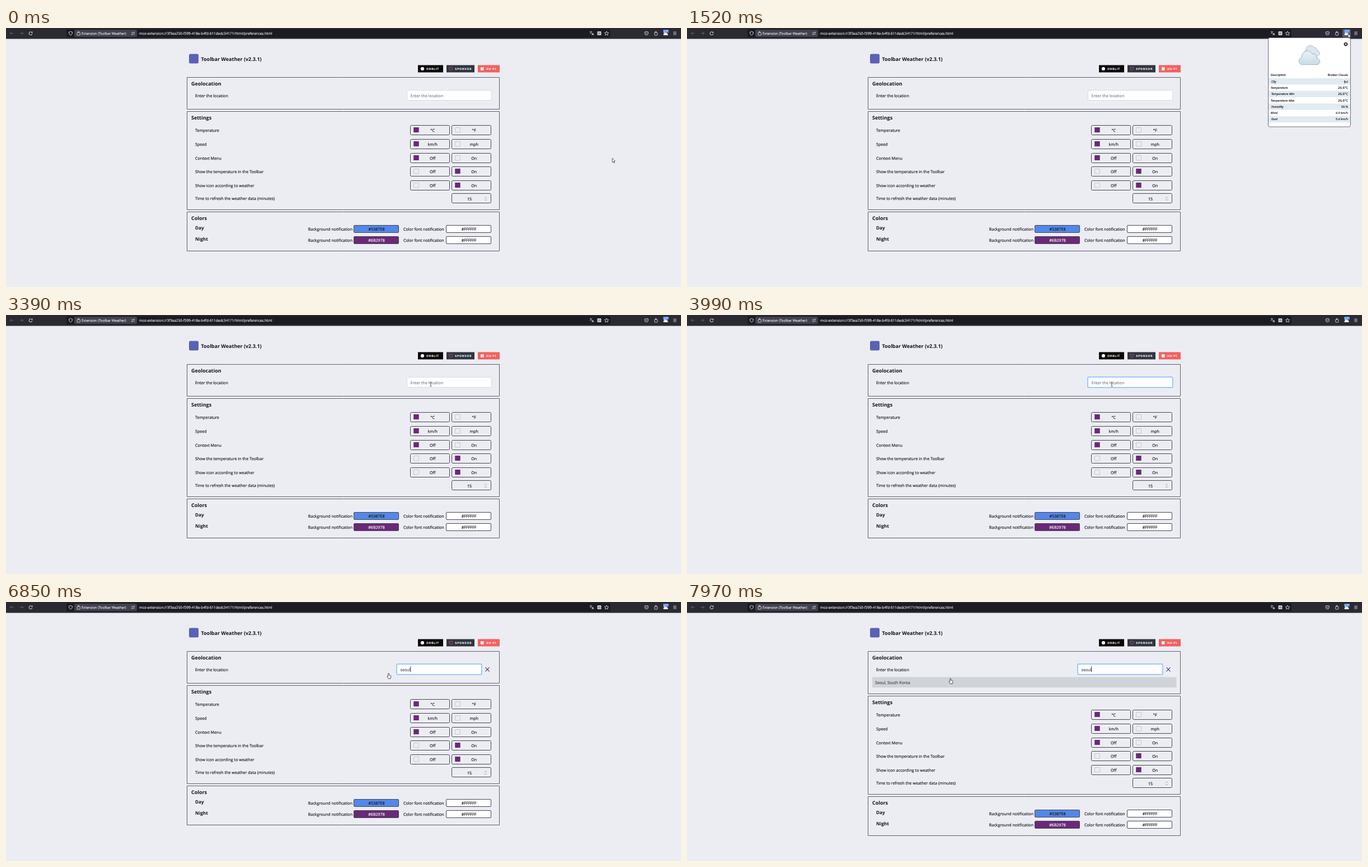
Animation of 1206 by 464 pixels, one loop 8000 ms. Source, as an HTML page with a canvas:

```html
<!DOCTYPE html>
<html lang="en">
<head>
<meta charset="utf-8">
<title>Toolbar Weather preferences</title>
<style>
  html, body { margin: 0; width: 100%; height: 100%; overflow: hidden; background: #ecedf3; }
  canvas { display: block; width: 1206px; height: 464px; }
</style>
</head>
<body>
<canvas id="stage" width="1206" height="464"></canvas>
<script>
const ctx = document.getElementById('stage').getContext('2d');
const LOOP = 8000;
const INK = '#121219', PAGE = '#ecedf3', PURPLE = '#6b2978', BLUE = '#5387e8';
const FRAME = '#5e5f68', EDGE = '#474851';
const STRIPE = '#e1ebf1', ICON = '#e6e6ee', DIM = '#67666f';
const SANS = '"Open Sans", sans-serif', BADGE = '"DejaVu Sans", sans-serif';
const ZOOM = 8; // lay text out large so that small sizes keep exact advances

function setFont({ size = 7.12, style = '', font = SANS, space = 0 }) {
  ctx.font = `${style} ${size * ZOOM}px ${font}`;
  ctx.letterSpacing = space * ZOOM + 'px';
  ctx.textRendering = 'geometricPrecision';
}

// y is the middle of the capitals
function say(str, x, y, opt = {}) {
  const { size = 7.12, color = INK, align = 'left', style } = opt;
  ctx.save();
  ctx.translate(x, y + size * 0.36);
  ctx.scale(1 / ZOOM, 1 / ZOOM);
  setFont(opt);
  ctx.textAlign = align;
  ctx.fillStyle = ctx.strokeStyle = color;
  ctx.fillText(str, 0, 0);
  if (style !== 'bold') {
    ctx.lineWidth = 0.14 * ZOOM;
    ctx.lineJoin = 'round';
    ctx.strokeText(str, 0, 0);
  }
  ctx.restore();
}

function textWidth(str) {
  ctx.save();
  setFont({});
  const w = ctx.measureText(str).width / ZOOM;
  ctx.restore();
  return w;
}

function paint(fill, stroke, width = 1) {
  if (fill) { ctx.fillStyle = fill; ctx.fill(); }
  if (stroke) { ctx.strokeStyle = stroke; ctx.lineWidth = width; ctx.stroke(); }
}

function box(x, y, w, h, r, fill, stroke, width) {
  ctx.beginPath();
  ctx.roundRect(x, y, w, h, r);
  paint(fill, stroke, width);
}

function disc(x, y, r, fill, stroke, width) {
  ctx.beginPath();
  ctx.arc(x, y, r, 0, Math.PI * 2);
  paint(fill, stroke, width);
}

// points are offsets from x, y
function shape(x, y, pts, fill, stroke, width, closed = !!fill) {
  ctx.beginPath();
  for (let i = 0; i < pts.length; i += 2) ctx.lineTo(x + pts[i], y + pts[i + 1]);
  if (closed) ctx.closePath();
  paint(fill, stroke, width);
}

function line(x, y, pts, color, width = 1) {
  shape(x, y, pts, null, color, width);
}

function cloud(x, y, w, fill, stroke, width) {
  const puff = (cx, cy, r, a, b) =>
    ctx.arc(x + cx * w, y + cy * w, r * w, a * Math.PI / 180, b * Math.PI / 180);
  ctx.beginPath();
  puff(0.17, 0.52, 0.16, 90, 260);
  puff(0.4, 0.3, 0.26, 170, 335);
  puff(0.68, 0.34, 0.16, 265, 380);
  puff(0.83, 0.53, 0.15, 270, 450);
  ctx.closePath();
  paint(fill, stroke, width);
}

function puzzle(x, y) {
  box(x - 2.8, y - 1.8, 5.2, 5, 0.8, null, ICON, 0.8);
  disc(x - 0.4, y - 2.6, 1.1, null, ICON, 0.8);
}

function gear(x, y) {
  for (let i = 0; i < 8; i++) {
    const a = i * Math.PI / 4, c = Math.cos(a), s = Math.sin(a);
    line(x, y, [c * 2, s * 2, c * 3.6, s * 3.6], INK, 1.3);
  }
  disc(x, y, 2.1, null, INK, 1.3);
}

function toolbar(active) {
  ctx.fillStyle = '#2b2a33';
  ctx.fillRect(0, 0, 1206, 19.5);
  box(108, 2, 972, 15, 2, '#1c1b22');
  box(122, 3, 112, 13, 2, '#42414d');

  line(10.5, 9.5, [3, 0, -3, 0], DIM, 0.9);
  line(10.5, 9.5, [-0.5, -2.7, -3.2, 0, -0.5, 2.7], DIM, 0.9);
  line(27.5, 9.5, [-3, 0, 3, 0], DIM, 0.9);
  line(27.5, 9.5, [0.5, -2.7, 3.2, 0, 0.5, 2.7], DIM, 0.9);
  ctx.beginPath();
  ctx.arc(44, 9.7, 2.9, 0.2, 5.3);
  paint(null, ICON, 1);
  shape(44, 9.7, [0.8, -0.9, 3.4, -0.9, 3.4, -3.6], ICON);

  ctx.beginPath();
  ctx.moveTo(115.5, 6.2);
  ctx.quadraticCurveTo(117.2, 7.3, 118.6, 7.4);
  ctx.quadraticCurveTo(118.8, 11.5, 115.5, 13.2);
  ctx.quadraticCurveTo(112.2, 11.5, 112.4, 7.4);
  ctx.quadraticCurveTo(113.8, 7.3, 115.5, 6.2);
  paint(null, ICON, 0.9);

  puzzle(130, 9.8);
  say('Extension (Toolbar Weather)', 135, 10, { size: 6.05, color: '#f3f3f8' });
  line(227, 8.2, [-3, 0, 3, 0, 1.4, -1.5], ICON, 0.8);
  line(227, 11, [3, 0, -3, 0, -1.4, 1.5], ICON, 0.8);
  say('moz-extension://3f3ea250-f399-418e-b4fd-611dedc34171/html/preferences.html',
    238, 10, { size: 6.32, color: '#f3f3f8' });

  say('文', 1042.6, 8.6, { size: 5, color: ICON, font: '"Noto Sans CJK SC", "Noto Sans CJK JP", sans-serif' });
  say('A', 1046.6, 10.8, { size: 5.6, style: 'bold', color: ICON });
  box(1056.5, 6, 7, 7, 1, '#c9c9d1');
  line(1060, 9.5, [0, -2.5, 0, 2.5], '#55545e', 0.6);
  line(1060, 9.5, [-2.5, 0, 2.5, 0], '#55545e', 0.6);
  const star = [];
  for (let i = 0; i < 10; i++) {
    const a = i * Math.PI / 5, r = i % 2 ? 1.8 : 4;
    star.push(Math.sin(a) * r, -Math.cos(a) * r);
  }
  shape(1073, 9.8, star, null, ICON, 0.8, true);

  box(1141.3, 6.7, 6, 5.8, [1, 1, 3, 3], null, ICON, 0.9);
  line(1144.3, 9.3, [-1.5, -0.7, 0, 0.8, 1.5, -0.7], ICON, 0.9);
  puzzle(1161.5, 9.8);
  if (active) box(1171, 2, 15, 15, 2, '#5b5a66');
  cloud(1174.2, 7, 8.8, '#eaf1f8');
  box(1174, 3, 10, 5.6, 0.8, BLUE);
  say('27°', 1179.2, 5.8, { size: 4.9, color: '#fff', align: 'center' });
  for (const y of [7.2, 9.5, 11.8]) line(1195, y, [-2.8, 0, 2.8, 0], ICON, 0.8);
}

function badge(x, w, fill, label) {
  ctx.fillStyle = fill;
  ctx.fillRect(x, 66.5, w, 13);
  say(label, x + 15, 73.1, { size: 4.75, style: 'bold', color: '#fff', font: BADGE, space: 0.6 });
}

function header() {
  box(327, 46.5, 17, 17, 2.5, '#5a62b5');
  say('Toolbar Weather (v2.3.1)', 348.5, 56, { size: 8.95, style: 'bold' });
  badge(736, 45, '#0b0808', 'ORBLIT');
  badge(787, 50, '#31363e', 'SPONSOR');
  badge(843, 39, '#f4615f', 'DU-PI');
  disc(744, 73, 3.1, '#fff');
  ctx.beginPath();
  ctx.moveTo(794.8, 76);
  ctx.bezierCurveTo(789.2, 72, 792.5, 68.2, 794.8, 71.2);
  ctx.bezierCurveTo(797.1, 68.2, 800.4, 72, 794.8, 76);
  paint(null, '#d8588c', 0.8);
  ctx.fillStyle = '#fff';
  ctx.fillRect(848, 70.3, 5.5, 5.5);
}

function panel(y, bottom, title) {
  box(323.5, y, 558, bottom - y, 0, null, FRAME);
  say(title, 331, y + 10.8, { size: 8.95, style: 'bold' });
}

function choice(x, y, label, on) {
  box(x, y, 70, 17, 2, null, EDGE);
  if (on) {
    ctx.fillStyle = PURPLE;
    ctx.fillRect(x + 5.7, y + 3.5, 9.5, 9);
  } else {
    box(x + 6, y + 4, 9, 8.5, 0.5, null, '#c3c4cc', 0.9);
  }
  say(label, x + 39.7, y + 9.3, { align: 'center' });
}

function swatch(x, y, fill, color, label) {
  box(x, y, 80, 13, 1.5, fill, EDGE);
  say(label, x + 40.5, y + 7.3, { color, align: 'center' });
}

function settings() {
  panel(149.5, 325.5, 'Settings');
  const rows = [
    ['Temperature', '°C', '°F', 0],
    ['Speed', 'km/h', 'mph', 0],
    ['Context Menu', 'Off', 'On', 0],
    ['Show the temperature in the Toolbar', 'Off', 'On', 1],
    ['Show icon according to weather', 'Off', 'On', 1],
  ];
  rows.forEach(([label, a, b, picked], i) => {
    const y = Math.floor(174.6 + i * 24.7) + 0.5;
    say(label, 338, y + 9.2);
    choice(722.5, y, a, picked === 0);
    choice(796.5, y, b, picked === 1);
  });
  say('Time to refresh the weather data (minutes)', 338, 305.8);
  box(796.5, 296.5, 70, 17, 2, null, EDGE);
  say('15', 828, 306, { align: 'center' });
  line(857, 303.8, [-1.8, 0.9, 0, -0.9, 1.8, 0.9], '#8a8a94', 0.8);
  line(857, 308, [-1.8, -0.9, 0, 0.9, 1.8, -0.9], '#8a8a94', 0.8);

  panel(329.5, 399.5, 'Colors');
  [['Day', BLUE, INK, '#5387E8'], ['Night', PURPLE, '#fff', '#6B2978']].forEach(([name, fill, color, hex], i) => {
    const y = 353.5 + i * 20;
    say(name, 338, y + 4.8, { size: 8.2, style: 'bold' });
    say('Background notification', 619, y + 6.7, { align: 'right' });
    swatch(621.5, y, fill, color, hex);
    say('Color font notification', 710, y + 6.7);
    swatch(786.5, y, '#fff', INK, '#FFFFFF');
  });
}

const FOCUS = 3450, FIRST_KEY = 4590, LIST = 7510;
const KEYS = [FIRST_KEY, 4720, 5050, 5390, 5580];

function caretOn(t) {
  if (t < FOCUS) return false;
  if (t < 4520) return t < 3990;
  if (t < 6120) return true;
  return t >= 6580 && (t < 7080 || t >= 7580);
}

function geolocation(t) {
  const open = t >= LIST;
  panel(88.5, open ? 164.5 : 145.5, 'Geolocation');
  say('Enter the location', 338, 121);
  const typed = 'seoul'.slice(0, KEYS.filter(k => t >= k).length);
  const x = typed ? 698.5 : 716.5;
  const glow = Math.max(0, Math.min(1, (t - FOCUS + 60) / 180));
  if (t >= FOCUS) {
    ctx.globalAlpha = glow;
    box(x - 1.5, 110, 154, 21, 2.5, '#a9cef9');
    ctx.globalAlpha = 1;
  }
  box(x, 111.5, 151, 18, 1.5, '#fff', t >= FOCUS ? '#8ebdf9' : '#d6d8df', 0.9);
  if (typed) {
    say(typed, x + 6, 121, { color: '#41454d' });
    line(860, 120.8, [-3.6, -3.6, 3.6, 3.6], '#41307a', 1.1);
    line(860, 120.8, [3.6, -3.6, -3.6, 3.6], '#41307a', 1.1);
  } else {
    say('Enter the location', x + 6, 121, { color: '#777d86' });
  }
  if (caretOn(t)) {
    ctx.fillStyle = INK;
    ctx.fillRect(x + 6 + textWidth(typed), 115.5, 0.8, 10.2);
  }
  if (open) {
    ctx.fillStyle = '#d0d3d8';
    ctx.fillRect(331, 134.5, 543.5, 18.7);
    say('Seoul, South Korea', 336, 144, { color: '#3f4249' });
  }
}

function forecast(y, when, what, range) {
  ctx.fillStyle = STRIPE;
  ctx.fillRect(1039, y, 146, 28);
  say(when, 1043.7, y + 8.5, { size: 5.1 });
  say(what, 1043.7, y + 17.3, { size: 7.1, style: 'bold' });
  say(range, 1180.5, y + 15.2, { size: 5.25, align: 'right' });
}

function popup(t) {
  const shown = Math.min(1, (t - 1020) / 240, (2990 - t) / 140);
  if (t < 1060 || shown <= 0) return;
  const tall = t >= 1590;
  ctx.save();
  ctx.globalAlpha = shown;
  box(1038.5, 17.5, 147, tall ? 222.5 : 159.5, 3, '#fff', '#6f6f7a', 1);
  ctx.beginPath();
  ctx.roundRect(1039, 18, 146, tall ? 221.5 : 158.5, 2.5);
  ctx.clip();
  gear(1177, 29);
  cloud(1102, 30, 29, '#dbe6ee', '#8ea8b8', 0.7);
  const sky = ctx.createLinearGradient(0, 40, 0, 65);
  sky.addColorStop(0, '#edf4f8');
  sky.addColorStop(1, '#c9dce7');
  cloud(1093, 39.5, 38.5, sky, '#8ea8b8', 0.8);

  const rows = [
    ['Description', 'Broken Clouds'], ['City', 'Ijui'],
    ['Temperature', '26.6°C'], ['Temperature Min', '26.6°C'], ['Temperature Max', '26.6°C'],
    ['Humidity', '56 %'], ['Wind', '4.9 km/h'], ['Gust', '5.4 km/h'],
  ];
  rows.forEach(([label, value], i) => {
    const y = 84.4 + i * 11.3;
    if (i % 2) {
      ctx.fillStyle = STRIPE;
      ctx.fillRect(1039, y - 5.6, 146, 11.3);
    }
    say(label, i % 2 ? 1043.9 : 1042.8, y, { size: 5.5, style: 'italic' });
    say(value, 1181, y, { size: value.includes('°') ? 5.9 : 5.35, align: 'right' });
  });

  if (tall) {
    forecast(177, 'Tomorrow', 'Clear Sky', '27.9°C - 27.9°C');
    forecast(212.3, 'Next 48 hours', 'Scattered Clouds', '29.2°C - 29.2°C');
    for (let i = 0; i < 16; i++) {
      const a = i * Math.PI / 8, c = Math.cos(a), s = Math.sin(a);
      line(1131, 191, [c * 5, s * 5, c * 7.6, s * 7.6], '#edbd62', 1);
    }
    disc(1131, 191, 5.2, '#fad37a', '#e2ac4d', 0.7);
    cloud(1122, 222.5, 17.5, '#e8f0f5', '#b9cad5', 0.6);
  }
  ctx.restore();
}

// first time, last time, steps, end x, end y
const MOVES = [
  [320, 920, 10, 1181, 10],
  [1590, 1980, 7, 1122, 143],
  [2180, 2650, 8, 950, 165],
  [2780, 2980, 4, 885, 152],
  [3060, 3190, 3, 759, 124],
  [4520, 4520, 1, 755, 121],
  [6580, 6850, 5, 683.5, 127.3],
  [6910, 7370, 8, 538.5, 136.8],
  [7440, 7970, 8, 470.7, 136.5],
];

function cursorAt(t) {
  let x = 1083, y = 233;
  for (const [from, to, steps, ex, ey] of MOVES) {
    if (t < from) break;
    const gap = (to - from) / Math.max(1, steps - 1) || 1;
    const p = Math.min(1, (Math.floor((t - from) / gap + 1e-6) + 1) / steps);
    const e = p * p * (3 - 2 * p);
    x += (ex - x) * e;
    y += (ey - y) * e;
  }
  return [x, y];
}

function cursor(t) {
  if (t >= 4520 && t < 6580) return;
  const [x, y] = cursorAt(t);
  const inInput = y > 111 && y < 131 && x > (t < FIRST_KEY ? 716 : 698) && x < 868;
  if (inInput) {
    line(x, y, [0, -3.6, 0, 3.6], '#44444c', 0.8);
    for (const s of [-1, 1]) line(x, y, [-1.8, 3.8 * s, 1.8, 3.8 * s], '#44444c', 0.7);
  } else if (t >= 6580) {
    ctx.beginPath();
    ctx.moveTo(x - 0.8, y + 6);
    ctx.lineTo(x - 0.8, y + 0.8);
    ctx.quadraticCurveTo(x, y - 0.4, x + 0.8, y + 0.8);
    ctx.lineTo(x + 0.8, y + 3.6);
    ctx.lineTo(x + 3.6, y + 4.3);
    ctx.quadraticCurveTo(x + 4.6, y + 4.7, x + 4.3, y + 6.4);
    ctx.lineTo(x + 3.4, y + 10);
    ctx.lineTo(x - 0.3, y + 10);
    ctx.lineTo(x - 2.6, y + 6.2);
    ctx.quadraticCurveTo(x - 2.2, y + 4.8, x - 0.8, y + 6);
    paint('#fff', '#22222a', 0.8);
  } else {
    shape(x, y, [0.2, 0.2, 0.2, 7.8, 1.9, 6.2, 3.1, 8.8, 4.3, 8.3, 3.1, 5.7, 5.4, 5.5], '#fff', '#22222a', 0.7);
  }
}

function draw(now) {
  const t = now % LOOP;
  ctx.fillStyle = PAGE;
  ctx.fillRect(0, 0, 1206, 464);
  toolbar(t >= 880 && t < 2900);
  header();
  geolocation(t);
  ctx.save();
  if (t >= LIST) ctx.translate(0, 19);
  settings();
  ctx.restore();
  popup(t);
  cursor(t);
  requestAnimationFrame(draw);
}
requestAnimationFrame(draw);
</script>
</body>
</html>
```
